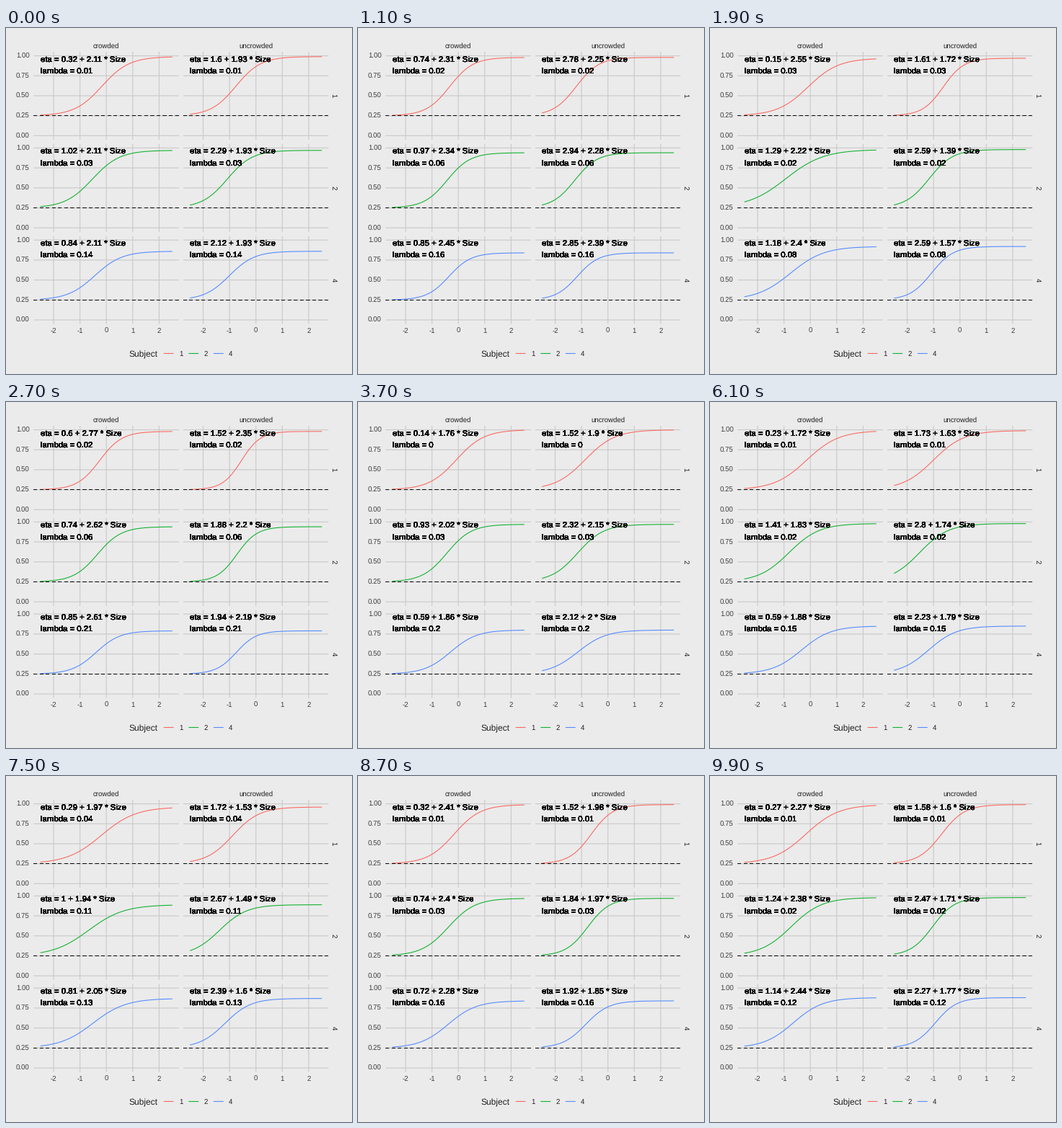
A matplotlib script that plays this animation: 480 px wide and 480 px high, repeating every 10 s.

```python
import numpy as np
import matplotlib.pyplot as plt
from matplotlib.animation import FuncAnimation

SIZE, FRAMES, INTERVAL = 480, 100, 100
DRAWS = 73  # posterior draws shown per loop
PT = 0.72  # points per pixel at 100 dpi

BG, GRID, GREY, DARK = "#EBEBEB", "#CBCBCB", "#3C3C3C", "#1F1F1F"
SUBJECTS = {"1": "#FB665E", "2": "#0DB02B", "4": "#5188FF"}
CONDITIONS = ["crowded", "uncrowded"]
GUESS = 0.25
OVERPLOT = 14  # stacked copies harden the edges of labels and dashes

# Centre of the posterior: per subject, then per condition
INTERCEPT = np.array([0.324, 1.017, 0.842])
LAPSE = np.array([0.01, 0.03, 0.14])
SLOPE = np.array([2.11, 1.93])
EFFECT = 1.274

plt.rcParams["font.family"] = ["Liberation Sans", "DejaVu Sans"]
plt.rcParams["text.hinting"] = "none"

rng = np.random.default_rng(4)


def draw(spread):
    """Intercepts and slopes (subject x condition) and lapse rates."""
    def noise(sd, shape):
        return spread * rng.normal(0, sd, shape)

    shift = noise(0.25, (3, 1)) * [1, 0.8]
    effect = EFFECT + noise(0.3, 1) + noise(0.08, 3)
    a = np.column_stack([INTERCEPT, INTERCEPT + effect]) + shift
    b = SLOPE + noise(0.2, 2) + noise(0.1, (3, 1))
    lam = np.abs(LAPSE + noise(0.04, 3))
    return [np.round(v, 2) + 0.0 for v in (a, b, lam)]


# The loop opens at the centre, then jumps from draw to draw
draws = [draw(min(k, 1)) for k in range(DRAWS)]


def px(x, col):
    return 139.2 + 207.5 * col + 36.6 * x


def py(y, row):
    return 149.4 + 127.8 * row - 110.8 * y


def label(x, y, s, size=9.6, color=GREY, ha="center", va="baseline", **kw):
    return ax.text(x, y, s, fontsize=size * PT, color=color, ha=ha, va=va,
                   **kw)


def line(x, y, color, width=1.07, **kw):
    return ax.plot(x, y, color=color, lw=width * PT, snap=False,
                   solid_capstyle="butt", dash_capstyle="butt", **kw)[0]


def stack(x, y):
    return [label(x, y, "", 11.38, "black", "left") for _ in range(OVERPLOT)]


fig = plt.figure(figsize=(SIZE / 100, SIZE / 100), dpi=100, facecolor=BG)
ax = fig.add_axes([0, 0, 1, 1])
ax.set(xlim=(0, SIZE), ylim=(SIZE, 0))
ax.axis("off")

xs = np.linspace(-2.5, 2.5, 101)
panels = []

for row, (subject, color) in enumerate(SUBJECTS.items()):
    for col in range(2):
        left, right = px(-2.75, col), px(2.75, col)
        top, bottom = py(1.05, row), py(-0.05, row)
        for tick in np.linspace(0, 1, 5):
            line([left, right], [py(tick, row)] * 2, GRID, 1.2)
        for tick in range(-2, 3):
            line([px(tick, col)] * 2, [top, bottom], GRID, 1.2)
        curve = line(px(xs, col), 0 * xs, color)
        y = np.floor(py(GUESS, row)) + 0.5
        for _ in range(OVERPLOT):
            line([left, right], [y, y], "black", 1, ls=(0, (4.27, 4.27)))
        x, base = px(-2.5, col), 47.4 + 127.8 * row
        panels.append((row, col, curve, stack(x, base), stack(x, base + 16.2)))

    for tick in np.linspace(0, 1, 5):
        label(32.7, py(tick, row) + 3.4, f"{tick:.2f}", ha="right")
    label(454.3, py(0.5, row), subject, color=DARK, va="center", rotation=-90)

for col, name in enumerate(CONDITIONS):
    label(px(0, col), 28.4, name, color=DARK)
    for tick in range(-2, 3):
        label(px(tick, col), 423.4, str(tick))

label(170.5, 456.2, "Subject", 12, DARK, "left")
for k, (subject, color) in enumerate(SUBJECTS.items()):
    x = 218.7 + 34.6 * k
    line([x, x + 13.8], [451.5, 451.5], color)
    label(x + 23.8, 455.2, subject, color=DARK)


def update(i):
    a, b, lam = draws[i * DRAWS // FRAMES]
    for row, col, curve, eta_stack, lam_stack in panels:
        # each curve takes the slope of the other condition
        eta = a[row, col] + b[row, 1 - col] * xs
        p = GUESS + (1 - GUESS - lam[row]) / (1 + np.exp(-eta))
        curve.set_ydata(py(p, row))
        for t in eta_stack:
            t.set_text(f"eta = {a[row, col]:g} + {b[row, col]:g} * Size")
        for t in lam_stack:
            t.set_text(f"lambda = {lam[row]:g}")
    return []


anim = FuncAnimation(fig, update, frames=FRAMES, interval=INTERVAL,
                     init_func=lambda: update(0), repeat=True, repeat_delay=0)
plt.show()
```
